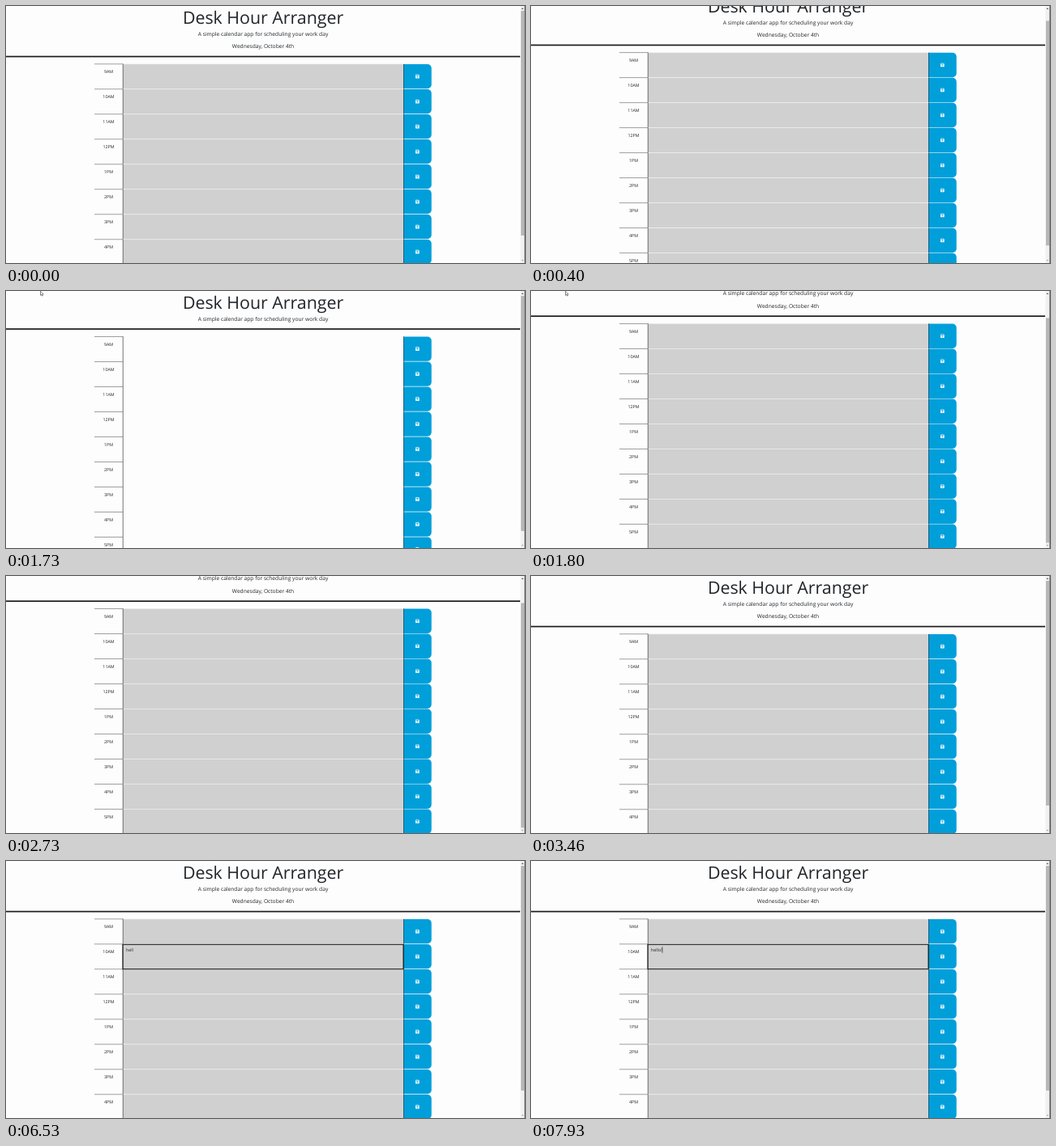
These frames come from a looping animation (640x318 px, 8 s). An HTML page with a canvas:

```html
<!DOCTYPE html>
<html lang="en">
<head>
<meta charset="utf-8">
<title>Desk Hour Arranger</title>
<style>
  html, body { margin: 0; height: 100%; overflow: hidden; background: #fdfdfd; }
  canvas { display: block; }
</style>
</head>
<body>
<canvas id="stage" width="640" height="318"></canvas>
<script>
const W = 640, H = 318, VIEW = 634, LOOP = 8000, FPS = 15;
const ROW = 31, PAST = '#d0d0d0', BLUE = '#009fda', INK = '#212529', PAPER = '#fdfdfd';
const HOURS = ['9AM', '10AM', '11AM', '12PM', '1PM', '2PM', '3PM', '4PM', '5PM'];
const ctx = document.getElementById('stage').getContext('2d');
ctx.textRendering = 'geometricPrecision';

// [time, typed text]; each key press restarts the caret blink
const KEYS = [[4000, ''], [5530, 'h'], [5660, 'he'], [5860, 'hel'], [5930, 'hell'], [6600, 'hello'], [6860, 'hello!']];
const BLINK = 530;

const progress = (t, from, to) => Math.min(1, Math.max(0, (t - from) / (to - from)));
const ease = p => p * p * (3 - 2 * p);
const mix = (a, b, p) => a + (b - a) * p;

function rect(x, y, w, h, color) {
  ctx.fillStyle = color;
  ctx.fillRect(x, y, w, h);
}

function shape(points, color) {
  ctx.beginPath();
  points.forEach(([x, y]) => ctx.lineTo(x, y));
  ctx.closePath();
  ctx.fillStyle = color;
  ctx.fill();
}

function text(string, x, y, size, align = 'center') {
  ctx.font = `${size}px "Open Sans", sans-serif`;
  ctx.textAlign = align;
  ctx.fillStyle = INK;
  ctx.fillText(string, x, y);
}

function saveButton(y) {
  ctx.beginPath();
  ctx.roundRect(490, y + 0.5, 34.7, ROW - 0.7, [0, 5, 5, 0]);
  ctx.fillStyle = BLUE;
  ctx.fill();
  rect(490, y + 0.3, 0.8, ROW - 0.3, '#174a60');
  // floppy disk
  ctx.beginPath();
  ctx.roundRect(505, y + 13.3, 4.6, 4.6, [0.5, 1.3, 0.5, 0.5]);
  ctx.fillStyle = '#fff';
  ctx.fill();
  rect(505.7, y + 14, 2.8, 1.1, BLUE);
  rect(506.7, y + 15.8, 1.2, 1.2, BLUE);
}

function typing(t, y) {
  ctx.strokeStyle = '#1c1c1c';
  ctx.lineWidth = 1.1;
  ctx.strokeRect(144, y + 0.8, 346, ROW - 0.6);
  const [since, typed] = KEYS.findLast(([at]) => t + 7 >= at);
  text(typed, 148, y + 40.7 - ROW, 16 / 3, 'left');
  if (Math.floor((t - since + 10) / BLINK) % 2 === 0)
    rect(148 + ctx.measureText(typed).width, y + 3.6, 0.7, 7.6, '#222');
}

function scrollbar(scroll, pageHeight) {
  rect(VIEW + 0.3, 0, W - VIEW, H, '#f1f1f1');
  const track = H - 12;
  rect(635, 6 + track * scroll / pageHeight, 4, track * H / pageHeight, '#b8b8b8');
  rect(639.2, 0, 0.8, H, '#777');
  shape([[635.6, 4], [638.2, 4], [636.9, 2.2]], '#505050');
  shape([[635.6, 314], [638.2, 314], [636.9, 315.8]], '#a3a3a3');
}

function arrow(x, y) {
  ctx.beginPath();
  [[0, 0], [0, 5], [1.2, 4], [2, 5.8], [2.9, 5.4], [2.1, 3.7], [3.7, 3.6]]
    .forEach(([dx, dy]) => ctx.lineTo(x + dx, y + dy));
  ctx.closePath();
  ctx.fillStyle = '#fff';
  ctx.fill();
  ctx.strokeStyle = '#333';
  ctx.lineWidth = 0.6;
  ctx.stroke();
}

function cursor(t) {
  if (t < 990 || t > 3800) return;
  if (t < 2390) {
    const p = ease(progress(t, 930, 1260));
    arrow(mix(636, 42.5, p), mix(120, 0.3, p));
  } else if (t < 2730) {
    const p = ease(progress(t, 2330, 2730));
    arrow(mix(42.5, 636, p), mix(0.3, 40, p));
  } else if (t > 3500) {
    const p = ease(progress(t, 3450, 3800)), x = mix(637, 300, p);
    if (x > 490) arrow(x, mix(22, 115, p));
  }
}

function scrollAt(t) {
  if (t < 1730) return 31.9 * ease(progress(t, 0, 866));
  return t >= 1795 && t < 2930 ? 31.4 : 0;
}

function draw(t) {
  const reloading = t >= 1730 && t < 1795;
  const lift = reloading ? 15.5 : 0;
  const scroll = scrollAt(t);

  rect(0, 0, W, H, PAPER);
  ctx.save();
  ctx.translate(0, -scroll);
  text('Desk Hour Arranger', 317, 21.8, 64 / 3);
  text('A simple calendar app for scheduling your work day', 317, 36.8, 20 / 3);
  if (!reloading) text('Wednesday, October 4th', 317, 52.2, 20 / 3);

  ctx.translate(0, -lift);
  rect(0, 61.7, VIEW, 1.7, '#1b1b1b');
  HOURS.forEach((hour, i) => {
    const y = 71.5 + i * ROW;
    if (!reloading) {
      rect(144, y, 346, ROW, '#ebebeb');
      rect(144, y + 0.7, 346, ROW - 0.7, PAST);
    }
    rect(109, y, 35, 0.7, '#777');
    text(hour, 126.5, y + 11.8, 16 / 3);
    rect(143.8, y, 0.8, ROW, '#555');
    saveButton(y);
  });
  if (t >= 3995) typing(t, 71.5 + ROW);
  ctx.restore();

  scrollbar(scroll, 350 - lift);
  cursor(t);
}

function tick(now) {
  // the screen refreshes on a fixed 15 Hz grid
  const step = Math.floor((now % LOOP + 7) * FPS / 1000) % (LOOP * FPS / 1000);
  draw(step * 1000 / FPS);
  requestAnimationFrame(tick);
}
requestAnimationFrame(tick);
</script>
</body>
</html>
```
